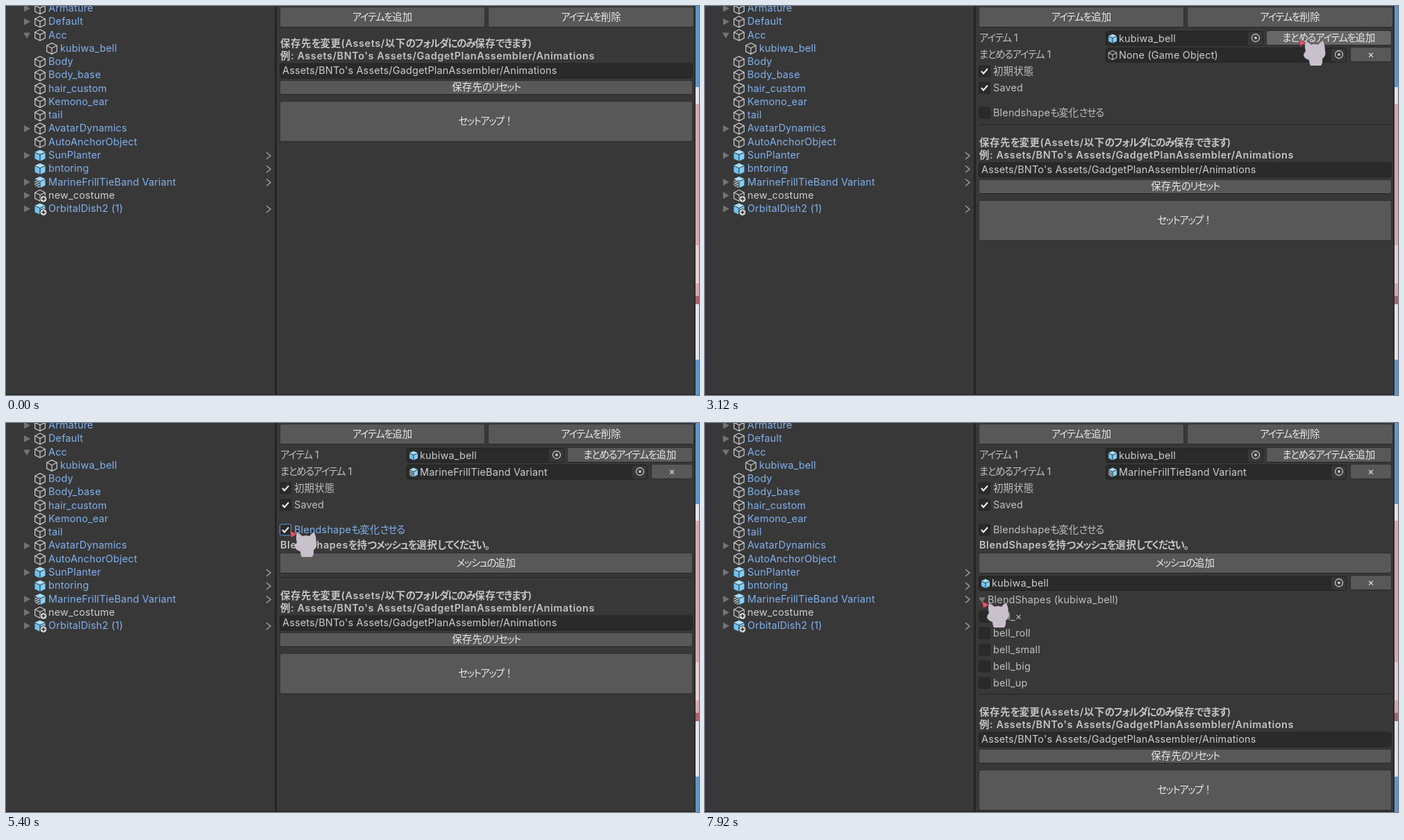
Recreate the animation shown at these times as an HTML page. Size 998x561 px, loop 8000 ms.

```html
<!DOCTYPE html>
<html lang="ja">
<head>
<meta charset="utf-8">
<title>Toggle setup</title>
<style>
html, body { margin: 0; width: 100%; height: 100%; overflow: hidden; background: #383838; }
svg { display: block; width: 998px; height: 561px; }
text { font: 14.4px Inter, "Noto Sans CJK JP", "Noto Sans CJK", sans-serif; letter-spacing: .2px; fill: #cdcdcd; }
.kana { letter-spacing: -1.4px; font-feature-settings: "palt"; }
.bold { font-weight: 600; letter-spacing: .6px; fill: #c4c4c4; }
.bold .kana { letter-spacing: -1.2px; }
.label { fill: #bfbfbf; }
.blue { fill: #80b1ee; }
.mid { text-anchor: middle; fill: #e8e8e8; }
</style>
</head>
<body>
<svg viewBox="0 0 998 561">
  <defs>
    <g id="cube" fill="none" stroke="#c4c4c4" stroke-width="1.3" stroke-linejoin="round">
      <path d="M0-8 7.3-4.3V4.3L0 8-7.3 4.3V-4.3ZM-7.3-4.3 0-.6 7.3-4.3M0-.6V8"/>
    </g>
    <g id="prefab">
      <path d="M0-8 7.5-4.8 0-1.6-7.5-4.8Z" fill="#a5dcfb"/>
      <path d="M-7.5-3.8-.6-.7V8L-7.5 4.8Z" fill="#6fc3f3"/>
      <path d="M7.5-3.8.6-.7V8L7.5 4.8Z" fill="#82cff8"/>
    </g>
    <g id="variant">
      <use href="#prefab"/>
      <path d="M-7.5-3.8-.6-.7V8L-7.5 4.8Z" fill="#383838"/>
      <path d="M-7.5 0-3-2.5M-7.5 3.5-.6-.7M-6 6-.6 2.7M-3 7.5-.6 6" stroke="#c9dbe6" stroke-width="1.4"/>
    </g>
    <g id="badge">
      <circle r="5.2" fill="#303030"/><circle r="4.4" fill="#e2e2e2"/>
      <path d="M-2.8 0H2.8M0-2.8V2.8" stroke="#303030" stroke-width="1.5"/>
    </g>
    <g id="mascot">
      <path d="M0 0 10 5 2 10Z" fill="#e2566c" stroke="#6b2f3b" stroke-width=".8"/>
      <path d="M10 3Q14 4 18 8Q23 6 28 8Q32 3 35 2Q38 9 38 16Q40 24 34 28Q35 34 32 38H17Q15 34 15 30Q8 28 7 23Q8 19 10 17Q8 10 10 3Z" fill="#c8c0ca"/>
    </g>
    <g id="drag">
      <path d="M5.5 19.5H18.5V30H5.5Z" fill="none" stroke="#161616" stroke-width="1.3" stroke-dasharray="1.5 1.5"/>
      <path d="M0 0V17.5L4 14 6.7 20.5 10 19 7.3 12.7H12.6Z" fill="#fff" stroke="#222" stroke-width=".8"/>
      <path d="M13.5 26.5H21.5V34.5H13.5Z" fill="#fff" stroke="#222"/>
      <path d="M15 30.5H20M17.5 28V33" stroke="#111" stroke-width="1.4"/>
    </g>
  </defs>
  <g id="back"></g>
  <g id="panel"></g>
  <use id="pointer"/>
</svg>
<script>
const LOOP = 8000, STEP = 120;
const FOLDER = "Assets/BNTo's Assets/GadgetPlanAssembler/Animations";
const RIBBON = "MarineFrillTieBand Variant";
const byId = id => document.getElementById(id);

// name, icon, flags: > closed, v open, c child, + added, ) opens as prefab, w plain text
const TREE = [
  ["Armature", "cube", ">"], ["Default", "cube", ">"], ["Acc", "cube", "v"],
  ["kubiwa_bell", "cube", "c"], ["Body", "cube", ""], ["Body_base", "cube", ""],
  ["hair_custom", "cube", ""], ["Kemono_ear", "cube", ""], ["tail", "cube", ""],
  ["AvatarDynamics", "cube", ">"], ["AutoAnchorObject", "cube", ""],
  ["SunPlanter", "prefab", ">)"], ["bntoring", "prefab", ")"],
  [RIBBON, "variant", ">)"], ["new_costume", "cube", ">+w"],
  ["OrbitalDish2 (1)", "prefab", ">+)"]
];

// Moments at which the panel changes
const AT = { item: 1080, bell: 2400, extra: 3000, ribbon: 4560, blend: 5280,
             mesh: 5880, meshBell: 7080, unfold: 7680 };

// time, tip x, tip y, pointer shape up to the next entry
const PATH = [
  [0, 600, 600, "mascot"], [420, 600, 575, "mascot"], [960, 529, 20, "mascot"],
  [1220, 529, 20, "mascot"], [1740, 118, 58, "mascot"], [1860, 118, 58, "drag"],
  [2300, 660, 47, "drag"], [2400, 660, 47, "mascot"], [2800, 855, 48, "mascot"],
  [3140, 855, 48, "mascot"], [3660, 150, 252, "mascot"], [3800, 150, 252, "drag"],
  [4400, 690, 70, "drag"], [4560, 690, 70, "mascot"], [4920, 561, 114, "mascot"],
  [5220, 402, 153, "mascot"], [5340, 402, 153, "mascot"], [5760, 527, 195, "mascot"],
  [6020, 527, 195, "mascot"], [6400, 118, 58, "mascot"], [6480, 118, 58, "drag"],
  [6920, 478, 231, "drag"], [7080, 478, 231, "mascot"], [7560, 399, 257, "mascot"],
  [LOOP, 399, 257, "mascot"]
];

let tip = { x: 0, y: 0, shape: "mascot" };

const over = (x, y, w, h) => tip.x >= x && tip.x <= x + w && tip.y >= y && tip.y <= y + h;
const rect = (x, y, w, h, fill, stroke = "none", r = 0) =>
  `<rect x="${x}" y="${y}" width="${w}" height="${h}" rx="${r}" fill="${fill}" stroke="${stroke}"/>`;
const icon = (id, x, y, scale = 1) =>
  `<use href="#${id}" transform="translate(${x} ${y}) scale(${scale})"/>`;
const line = (d, color, width = 1) =>
  `<path d="${d}" fill="none" stroke="${color}" stroke-width="${width}"/>`;
const text = (x, y, words, cls = "") =>
  `<text x="${x}" y="${y + 5}" class="${cls}">` +
  words.replace(/[\u3041-\u30ff]+/g, '<tspan class="kana">$&</tspan>') + "</text>";
const arrow = (x, y, open) => `<path transform="translate(${x} ${y})" fill="#737373" d="${
  open ? "M-5-3.5H5L0 5Z" : "M-4-5 5 0-4 5Z"}"/>`;

function button(x, y, w, h, label) {
  const lit = tip.shape === "mascot" && over(x, y, w, h);
  return rect(x - .5, y - .5, w + 1, h + 1, lit ? "#676767" : "#585858", "#303030", 3) +
    line(`M${x + 2} ${y + h + .5}h${w - 4}`, "#262626") +
    text(x + w / 2, Math.floor(y + h / 2), label, "mid");
}

function objectField(x, y, w, name, kind) {
  const lit = tip.shape === "drag" && over(x, y - 10, w, 21);
  return rect(x + .5, y - 10, w - 1, 20.5, lit ? "#2c5d87" : "#2a2a2a", lit ? "#3f78ad" : "#222", 3) +
    rect(x + w - 22, y - 9, 21, 19, "#373737", "none", 2) +
    `<circle cx="${x + w - 11}" cy="${y - .5}" r="5.5" fill="none" stroke="#c4c4c4" stroke-width="1.3"/>` +
    `<circle cx="${x + w - 11}" cy="${y - .5}" r="2" fill="#c4c4c4"/>` +
    icon(kind, x + 10, y + .5, .8) + text(x + 19, y, name);
}

function toggle(y, label, checked, focused) {
  const hover = tip.shape === "mascot" && over(394, y - 11, 594, 22);
  const edge = focused ? "#5a9be0" : hover ? "#7a7a7a" : "#242424";
  return rect(394.5, y - 8, 16, 16, "#2a2a2a", edge, 2) +
    (checked ? line(`M398 ${y}l3 3.5 6-7`, "#f0f0f0", 2) : "") +
    text(415, y, label, focused ? "blue" : "label");
}

function drawBack() {
  const rows = TREE.map(([name, kind, flags], i) => {
    const has = f => flags.includes(f), y = 3 + 19.27 * i, x = has("c") ? 66 : 49;
    return (has(">") || has("v") ? arrow(30, y + .5, has("v")) : "") +
      icon(kind, x, y + .5) + (has("+") ? icon("badge", 54, y + 5.5) : "") +
      text(x + 12, y, name, has("w") ? "" : "blue") +
      (has(")") ? line(`M375 ${y - 4}l6 5-6 5`, "#a0a0a0", 1.4) : "");
  });
  byId("back").innerHTML = rect(0, 0, 998, 561, "#383838") + rows.join("") +
    rect(387, 0, 3, 561, "#242424") +
    rect(991, 0, 2, 561, "#2b2b2b") + rect(993, 0, 5, 561, "#5f95cf") +
    rect(993, 117, 5, 393, "#e4e2e4") + rect(993, 141, 5, 289, "#d9a9b0") +
    rect(993, 345, 5, 55, "#e6cfd3") + rect(993, 418, 5, 12, "#a8646e") +
    rect(0, 560, 992, 1, "#202020");
}

function drawPanel(t) {
  const on = name => t >= AT[name];
  let out = button(395, 2, 294, 28, "アイテムを追加") + button(695, 2, 295, 28, "アイテムを削除");
  let shift = 0;
  if (on("item")) {
    const drop = on("extra") ? 24 : 0;
    shift = 119 + drop;
    out += text(395, 46, "アイテム 1", "label") +
      objectField(577, 46.5, 227, on("bell") ? "kubiwa_bell" : "None (Game Object)", on("bell") ? "prefab" : "cube") +
      button(809, 36, 179, 20, "まとめるアイテムを追加");
    if (on("extra")) {
      out += text(395, 70, "まとめるアイテム 1", "label") +
        objectField(577, 70.5, 347, on("ribbon") ? RIBBON : "None (Game Object)", on("ribbon") ? "variant" : "cube") +
        button(930, 60, 58, 20, "×");
    }
    out += toggle(70 + drop, "初期状態", true) + toggle(94 + drop, "Saved", true) +
      toggle(130 + drop, "Blendshapeも変化させる", on("blend"), on("blend") && !on("unfold"));
  }
  if (on("blend")) {
    shift = 195;
    out += text(395, 176, "BlendShapesを持つメッシュを選択してください。", "bold") +
      button(395, 188, 593, 28, "メッシュの追加");
  }
  if (on("mesh")) {
    shift = 219;
    out += objectField(394, 231, 530, on("meshBell") ? "kubiwa_bell" : "None (Game Object)", on("meshBell") ? "prefab" : "cube") +
      button(930, 220.5, 58, 20, "×");
  }
  if (on("meshBell")) {
    shift = 243;
    out += arrow(399, 255, on("unfold")) + text(407, 254.5, "BlendShapes (kubiwa_bell)", "label");
  }
  if (on("unfold")) {
    shift = 363;
    out += ["bell_×", "bell_roll", "bell_small", "bell_big", "bell_up"]
      .map((name, i) => toggle(279 + 24 * i, name)).join("");
  }
  if (shift) out += line(`M395 ${shift + 28}H988`, "#242424", 1.2);
  return out + text(395, 54 + shift, "保存先を変更(Assets/以下のフォルダにのみ保存できます)", "bold") +
    text(395, 72 + shift, "例: " + FOLDER, "bold") +
    rect(394.5, 83 + shift, 594, 21, "#2a2a2a", "#222", 3) + text(398, 93 + shift, FOLDER) +
    button(395, 108 + shift, 593, 19, "保存先のリセット") +
    button(395, 138 + shift, 593, 57, "セットアップ！");
}

function movePointer(t) {
  const i = PATH.findIndex(p => p[0] > t);
  const [t0, x0, y0, shape] = PATH[i - 1], [t1, x1, y1] = PATH[i];
  const k = (t - t0) / (t1 - t0), e = k * k * (3 - 2 * k);
  tip = { x: x0 + (x1 - x0) * e, y: y0 + (y1 - y0) * e, shape };
  byId("pointer").setAttribute("href", "#" + shape);
  byId("pointer").setAttribute("transform", `translate(${tip.x} ${tip.y})`);
}

let start, shown = -1;
function play(now) {
  start ??= now;
  const t = Math.floor((now - start) % LOOP / STEP) * STEP;
  if (t !== shown) {
    shown = t;
    movePointer(t);
    byId("panel").innerHTML = drawPanel(t);
  }
  requestAnimationFrame(play);
}

drawBack();
movePointer(0);
byId("panel").innerHTML = drawPanel(0);
requestAnimationFrame(play);
</script>
</body>
</html>
```
